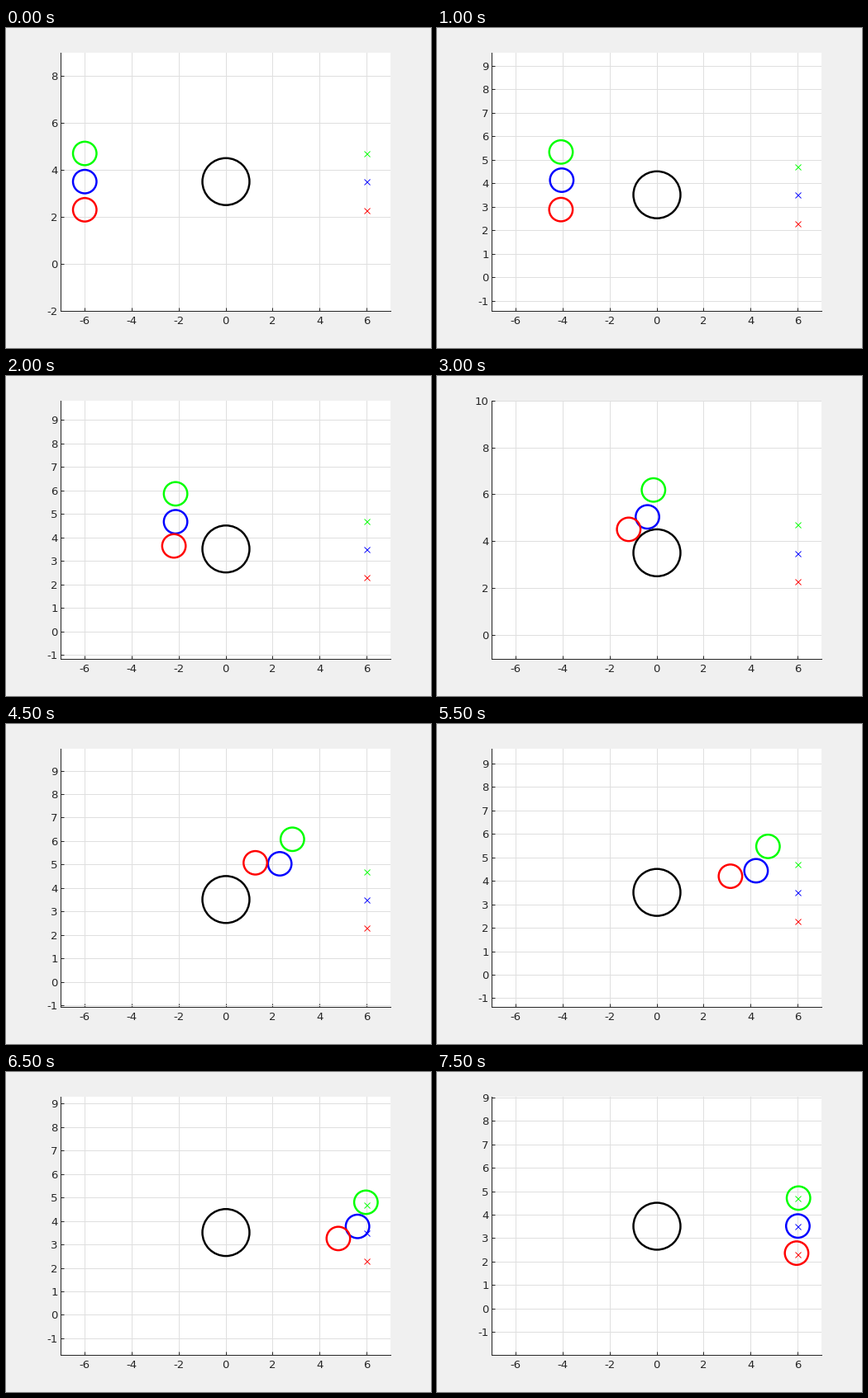
Recreate the animation shown at these times as a matplotlib script. Size 514 px wide and 388 px high, loop 8 s.

```python
import matplotlib.pyplot as plt
import numpy as np
from matplotlib.animation import FuncAnimation
from matplotlib.patches import Circle
from matplotlib.transforms import Affine2D

W, H, DPI = 514, 388, 100
PX = 72 / DPI                      # one pixel in points
LEFT, TOP, AX_W, AX_H = 66.34, 29.52, 398.4, 313.95
SPAN = 14 * AX_H / AX_W            # visible height in data units
INK = "#262626"
STEPS, ARRIVAL = 16, 15.5
SIDE, RADIUS = 6, 0.5              # agents cross from x = -SIDE to x = SIDE

# Colour, lane height and the (step, x, y) points passed on the way.
AGENTS = [
    ("#00ff00", 4.7, [(4, -2.14, 5.85), (8, 1.84, 6.21), (11, 4.72, 5.46),
                      (12, 5.58, 4.955), (13, 5.95, 4.79)]),
    ("#0000ff", 3.5, [(4, -2.14, 4.66), (8, 1.34, 5.13), (10, 3.24, 4.81),
                      (12, 5.06, 4.02)]),
    ("#ff0000", 2.3, [(2, -4.08, 2.87), (4, -2.21, 3.63), (6, -1.2, 4.5),
                      (8, 0.33, 5.31), (10, 2.2, 4.61), (12, 3.98, 3.75)]),
]
LANES = [lane for _, lane, _ in AGENTS]


def make_path(lane, via):
    """Smooth curve from start to goal that comes to rest at the goal."""
    keys = np.array([(0, -SIDE, lane), *via, (ARRIVAL, SIDE, lane)])
    times, points = keys[:, 0], keys[:, 1:]
    speeds = np.gradient(points, times, axis=0)
    speeds[-1] = 0

    def at(step):
        i = np.searchsorted(times, step, side="right") - 1
        span = times[i + 1] - times[i]
        u = (step - times[i]) / span
        ease = u * u * (3 - 2 * u)
        return (points[i] + ease * (points[i + 1] - points[i])
                + span * u * (1 - u) * ((1 - u) * speeds[i]
                                        - u * speeds[i + 1]))
    return at


fig = plt.figure(figsize=(W / DPI, H / DPI), dpi=DPI, facecolor="#f0f0f0")
ax = fig.add_axes([LEFT / W, 1 - (TOP + AX_H) / H, AX_W / W, AX_H / H])
ax.set_xlim(-7, 7)
ax.set_axisbelow(True)
ax.grid(color="#dfdfdf", lw=PX)
ax.spines[["top", "right"]].set_visible(False)
for side in ("left", "bottom"):
    ax.spines[side].set(color=INK, lw=PX)
ax.tick_params(direction="in", length=4 * PX, width=PX, color=INK,
               labelcolor=INK, labelsize=13.3 * PX,
               labelfontfamily="DejaVu Sans")
ax.tick_params(axis="x", pad=5.8 * PX)
ax.tick_params(axis="y", pad=3.7 * PX)

# Grid lines snap to whole pixels; rings keep their sub-pixel position.
ring_space = ax.transData + Affine2D().translate(0.45, 0.25)


def ring(center, radius, color, z):
    return ax.add_patch(Circle(center, radius, fill=False, ec=color,
                               lw=2.45 * PX, zorder=z, transform=ring_space))


def set_ticks(axis, values):
    axis.set_ticks(values, labels=[str(v) for v in values])


set_ticks(ax.xaxis, range(-6, 7, 2))
ring((0, 3.5), 1, "black", 3)
movers = []
for z, (color, lane, via) in enumerate(AGENTS, start=4):
    ax.plot(SIDE, lane, "x", color=color, ms=7 * PX, mew=0.95 * PX, zorder=3)
    movers.append((ring((-SIDE, lane), RADIUS, color, z),
                   make_path(lane, via)))


def draw(step):
    ys = []
    for shape, path in movers:
        shape.center = path(step)
        ys.append(shape.center[1])

    # The view is centred on the vertical extent of everything drawn.
    low = min(min(ys) - RADIUS, min(LANES))
    high = max(max(ys) + RADIUS, max(LANES))
    bottom = (low + high - SPAN) / 2
    top = bottom + SPAN
    ax.set_ylim(bottom, top)

    ticks = range(int(np.ceil(bottom)), int(np.floor(top)) + 1)
    if len(ticks) > 11:
        ticks = [v for v in ticks if v % 2 == 0]
    set_ticks(ax.yaxis, ticks)
    return [shape for shape, _ in movers]


anim = FuncAnimation(fig, draw, frames=STEPS, interval=500, repeat=True,
                     repeat_delay=0, blit=False)
plt.show()
```
